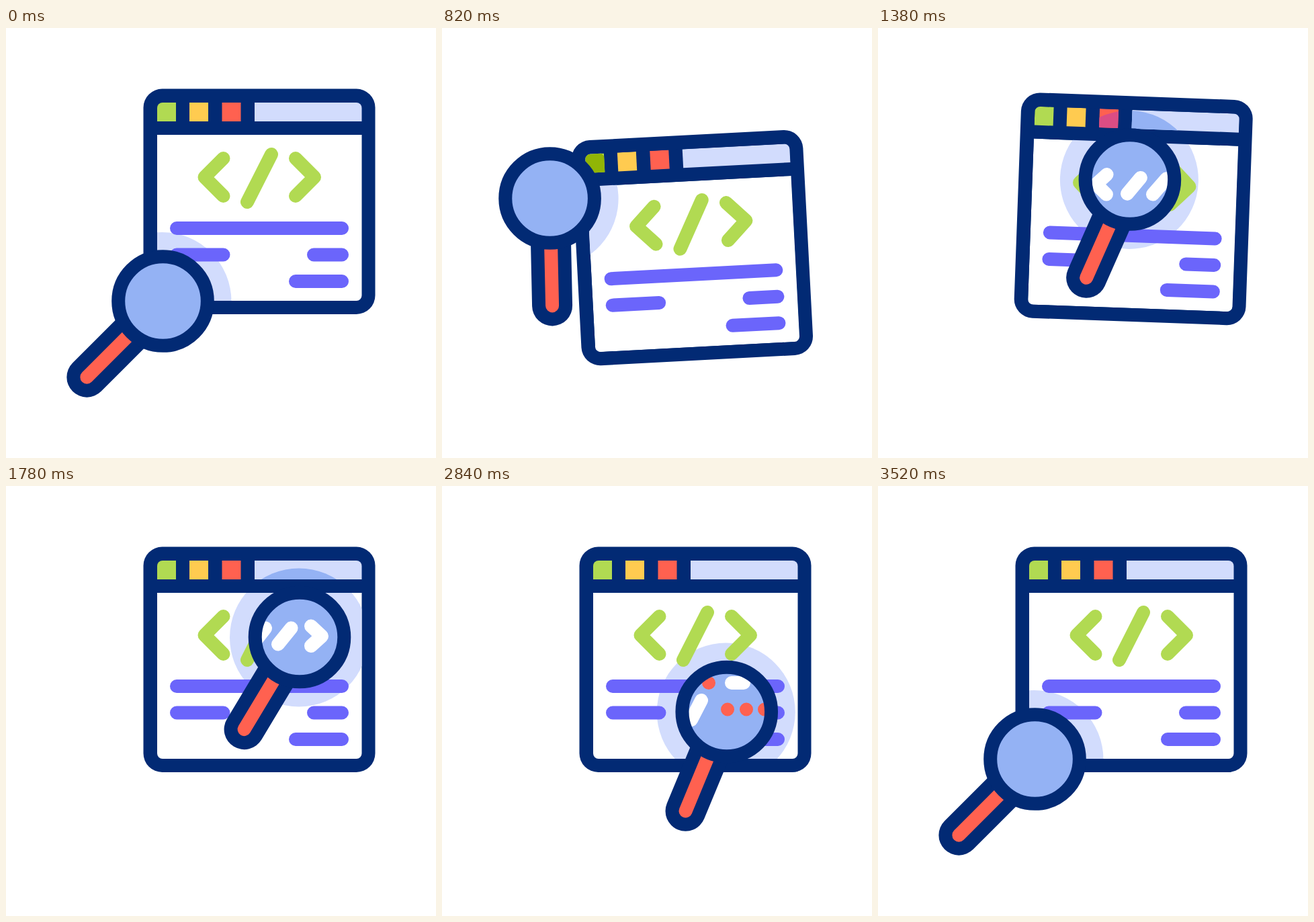
These frames come from a looping animation (640 by 640 pixels, 3600 ms). An HTML page:

```html
<!DOCTYPE html>
<html lang="en">
<head>
<meta charset="utf-8">
<title>Code search</title>
<style>
  html, body { margin: 0; width: 100%; height: 100%; overflow: hidden; background: #fff; }
  svg { display: block; width: 100vw; height: 100vh; }
  .ink { fill: #022a74; }
  .stroke { fill: none; stroke-width: 20; stroke-linecap: round; stroke-linejoin: round; }
  .green { stroke: #b1da52; }
  .violet { stroke: #6b65fb; }
  .red { stroke: #ff6150; }
  .white { stroke: #fff; }
</style>
</head>
<body>
<svg viewBox="0 0 640 640">
  <defs>
    <clipPath id="inside"><rect x="225" y="111" width="304.5" height="295" rx="8"/></clipPath>
    <clipPath id="glowClip"><circle class="glowPos" r="103"/></clipPath>
    <clipPath id="lensClip"><circle class="lensPos" r="56.5"/></clipPath>
  </defs>

  <g class="win">
    <rect class="ink" x="204.5" y="90.5" width="345" height="335.5" rx="28"/>
    <g clip-path="url(#inside)">
      <rect x="225" y="159" width="305" height="247" fill="#fff"/>
      <circle class="glowPos" r="103" fill="#d2dcfd"/>
      <rect class="ink" x="225" y="111" width="305" height="48"/>
      <rect x="225" y="111" width="28" height="28" fill="#b1da52"/>
      <rect x="273" y="111" width="28" height="28" fill="#ffcb50"/>
      <rect x="321.5" y="111" width="28" height="28" fill="#ff6150"/>
      <rect x="370" y="111" width="160" height="28" fill="#d2dcfd"/>
      <!-- header shades under the glow -->
      <g clip-path="url(#glowClip)">
        <rect x="225" y="111" width="28" height="28" fill="#91b506"/>
        <rect x="273" y="111" width="28" height="28" fill="#eeaf1c"/>
        <rect x="321.5" y="111" width="28" height="28" fill="#db4d84"/>
        <rect x="370" y="111" width="160" height="28" fill="#94b2f4"/>
      </g>
    </g>
    <path class="stroke green" d="M323.5 194 295.5 222 323.5 250M395 188 359 259M431 194 459 222 431 250"/>
    <path class="stroke violet" d="M254 298H500M254 337.5H323.5M458 337.5H500M431 377H500"/>
  </g>

  <g id="glass">
    <path class="stroke" stroke="#022a74" style="stroke-width:60" d="M0 50V160"/>
    <path class="stroke red" d="M0 66V160"/>
    <circle r="66.3" fill="#94b2f4"/>
  </g>

  <!-- text seen through the lens -->
  <g class="win">
    <g clip-path="url(#lensClip)">
      <path class="stroke white" d="M335.5 208.5 320 223.5 336 238M367 236 386 211.5M405 235.5 424.5 211.5M454 208.5 470 223.5 454 238"/>
      <path class="stroke red" d="M264 293H301M328 293h.01M397 293h.01M266 332.5h.01M294 332.5h.01M321 332.5h.01M425 332.5h.01M453 332.5h.01M480 332.5h.01"/>
      <path class="stroke white" d="M431 293H449M386 319 371 348"/>
    </g>
  </g>

  <circle class="stroke" id="ring" r="66.3" stroke="#022a74"/>
</svg>

<script>
  const LOOP = 3600;
  const PIVOT = { x: 377, y: 346 };

  // Lens legs: start, end, bezier points, handle angle at both ends
  const legs = [
    { t: [100, 700], x: [233.5, 248, 105, 150], y: [406.5, 332, 290, 258], a: [45, -2.5] },
    { t: [700, 1680], x: [150, 245, 338.8, 437], y: [258, 215, 228, 225], a: [-2.5, 31] },
    { t: [1800, 2310], x: [437, 386, 335, 284], y: [225, 265.3, 305.7, 346], a: [31, -18.4] },
    { t: [2440, 2980], x: [284, 340, 402, 445], y: [346, 344, 318, 345], a: [-18.4, 30] },
    { t: [3060, 3520], x: [445, 374.5, 304, 233.5], y: [345, 365.5, 386, 406.5], a: [30, 45] }
  ];

  // Window keys: [time, value]
  const lift = [[100, 0], [450, -25], [820, 68.7], [1580, 0]];
  const tilt = [[450, 0], [820, -3], [1220, 3.2], [1620, 0]];

  const ease = (t, a, b) => {
    const p = Math.min(1, Math.max(0, (t - a) / (b - a)));
    return (1 - Math.cos(Math.PI * p)) / 2;
  };
  const mix = (a, b, u) => a + (b - a) * u;
  const bezier = ([a, b, c, d], u) => {
    const v = 1 - u;
    return v * v * v * a + 3 * v * v * u * b + 3 * v * u * u * c + u * u * u * d;
  };
  const track = (keys, t) => {
    let value = keys[0][1];
    for (let i = 1; i < keys.length; i++) {
      if (t > keys[i - 1][0]) value = mix(keys[i - 1][1], keys[i][1], ease(t, keys[i - 1][0], keys[i][0]));
    }
    return value;
  };

  const all = s => [...document.querySelectorAll(s)];
  const wins = all('.win'), glows = all('.glowPos'), lenses = all('.lensPos');
  const [glass] = all('#glass'), [ring] = all('#ring');

  const place = (nodes, x, y) => nodes.forEach(n => {
    n.setAttribute('cx', x);
    n.setAttribute('cy', y);
  });

  function draw(t) {
    const leg = legs.filter(l => l.t[0] <= t).pop() || legs[0];
    const u = ease(t, ...leg.t);
    const x = bezier(leg.x, u), y = bezier(leg.y, u), angle = mix(...leg.a, u);
    const dy = track(lift, t), rot = track(tilt, t);

    wins.forEach(w => w.setAttribute('transform',
      `translate(0 ${dy}) rotate(${rot} ${PIVOT.x} ${PIVOT.y})`));
    glass.setAttribute('transform', `translate(${x} ${y}) rotate(${angle})`);
    place([ring], x, y);

    // Stage to window coordinates
    const r = -rot * Math.PI / 180, c = Math.cos(r), s = Math.sin(r);
    const px = x - PIVOT.x, py = y - dy - PIVOT.y;
    const lx = PIVOT.x + px * c - py * s, ly = PIVOT.y + px * s + py * c;
    place(lenses, lx, ly);
    place(glows, lx - 1, ly + 0.5);
  }

  const start = performance.now();
  function tick() {
    draw((performance.now() - start) % LOOP);
    requestAnimationFrame(tick);
  }
  tick();
</script>
</body>
</html>
```
